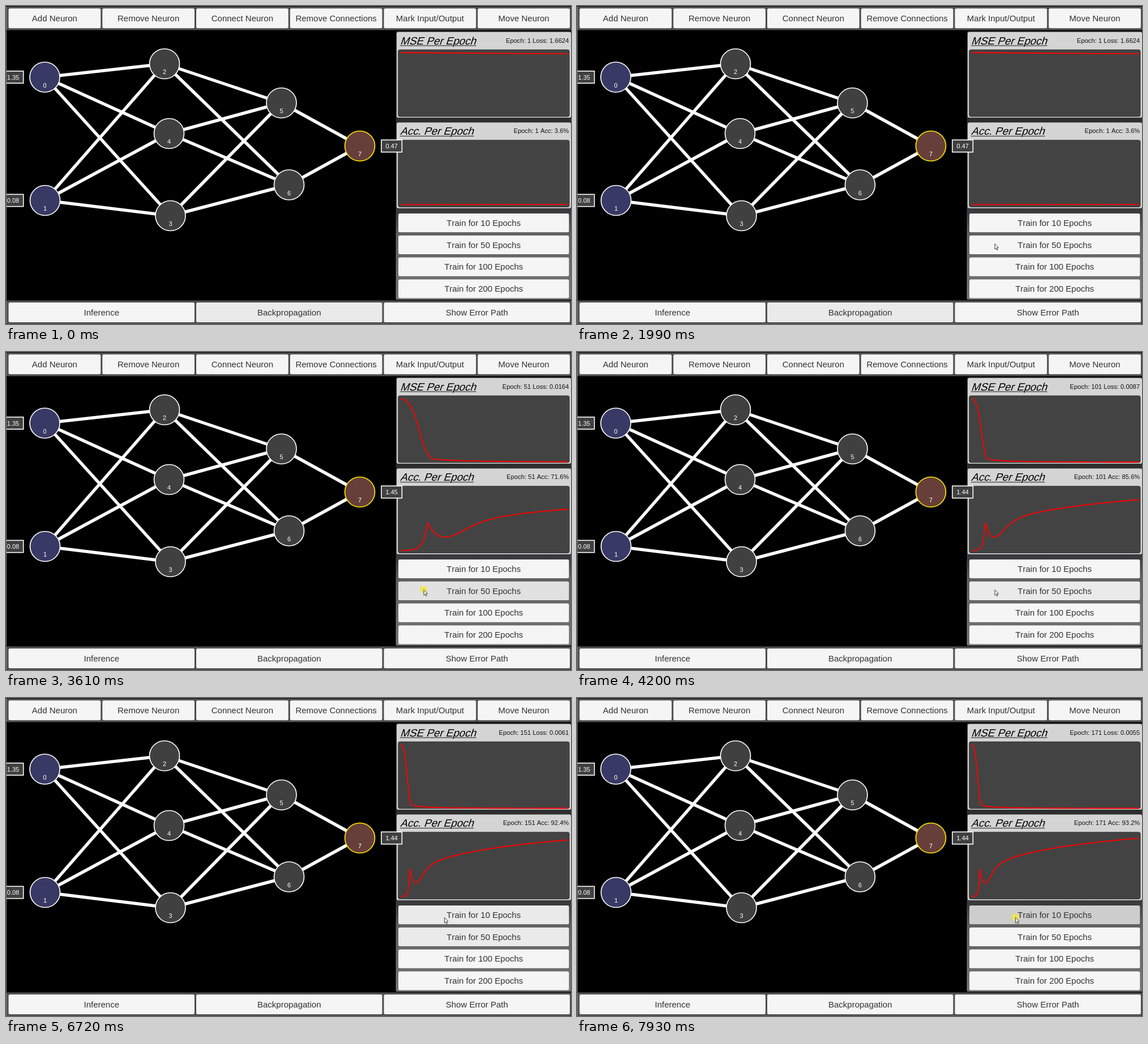
Animation, 998 px wide and 561 px high, one loop 8000 ms. Source, as an HTML page with a canvas:

```html
<!DOCTYPE html>
<html lang="en">
<head>
<meta charset="utf-8">
<title>Neural network trainer</title>
<style>
html, body { margin: 0; width: 100%; height: 100%; overflow: hidden; background: #000; }
canvas { display: block; }
</style>
</head>
<body>
<canvas id="stage" width="998" height="561"></canvas>
<script>
const ctx = document.getElementById('stage').getContext('2d');
const LOOP = 8000;
const SANS = '"Liberation Sans", Arial, sans-serif';
const NORMAL = 245, SELECTED = 234, PRESSED = 205;
const FADE = 60;

const nodes = [
  [68.5, 125.5], [69, 343], [280, 102], [290.5, 370],
  [288, 225], [486.5, 171], [500, 315.5], [625, 247]
];
const layers = [[0, 1], [2, 3, 4], [5, 6], [7]];

const epochSteps = [10, 50, 100, 200];
const untrained = { epoch: 1, loss: '1.6624', acc: '3.6', output: '0.47' };
const runs = [
  { press: 2090, done: 2800, btn: 1, loss: '0.0164', acc: '71.6', output: '1.45' },
  { press: 3593, done: 4200, btn: 1, loss: '0.0087', acc: '85.6', output: '1.44' },
  { press: 5093, done: 5710, btn: 1, loss: '0.0061', acc: '92.4', output: '1.44' },
  { press: 6803, done: 7030, btn: 0, loss: '0.0058', acc: '92.4', output: '1.44' },
  { press: 7313, done: 7530, btn: 0, loss: '0.0055', acc: '93.2', output: '1.44' },
  { press: 7870, done: LOOP, btn: 0 }
];
runs.reduce((epoch, run) => run.epoch = epoch + epochSteps[run.btn], untrained.epoch);

const pointerStart = { x: 988, y: 548, from: 190 };
const pointerMoves = [
  { from: 190, to: 590, x: 424, y: 443 },
  { from: 790, to: 1690, x: 709, y: 404 },
  { from: 1690, to: 1990, x: 737.5, y: 419 },
  { from: 6290, to: 6590, x: 774, y: 386.7 }
];
const HOVER_10 = 6590;

const clamp = v => Math.min(1, Math.max(0, v));
const mix = (a, b, k) => a + (b - a) * k;
const sigmoid = v => 1 / (1 + Math.exp(-v));
const grey = v => `rgb(${v},${v},${v})`;

// S-shaped drop, then a tail that shrinks with 1 / epoch
const loss = e => Math.max(1.69 * sigmoid(0.75 * (5.4 - e)), 0.85 / Math.max(e, 8));
const lossY = e => 194.9 - 112.6 * loss(e) / loss(0);

// Early spike at epoch 8, then logarithmic growth
function accY(e) {
  const spike = 45 * Math.exp(e < 8 ? 0.85 * (e - 8) : 0.3 * (8 - e));
  const growth = 25.2 * Math.log(1 + e / 2.9) * sigmoid((e - 16) / 4);
  return 350.4 - spike - growth;
}

function text(str, x, y, size, color, align = 'center') {
  ctx.font = `${size}px ${SANS}`;
  ctx.fillStyle = color;
  ctx.textAlign = align;
  ctx.fillText(str, x, y);
}

function box(x, y, w, h, r, fill) {
  ctx.beginPath();
  ctx.roundRect(x, y, w, h, r);
  ctx.fillStyle = fill;
  ctx.fill();
}

function button(label, x, y, w, h, shade = NORMAL) {
  box(x - 0.7, y - 0.7, w + 1.4, h + 1.4, 3, 'rgba(0,0,0,.25)');
  box(x, y, w, h, 2.5, grey(shade));
  text(label, x + w / 2, Math.round(y + h / 2 + 5.2), 15, '#323232');
}

function bar(y, h, labels, btnY, shades = []) {
  box(1, y, 997, h, 2, '#545454');
  const step = 994.5 / labels.length;
  labels.forEach((label, i) => button(label, 4.5 + i * step, btnY, step - 3, 35, shades[i]));
}

function valueBox(str, x, y) {
  ctx.fillStyle = '#404040';
  ctx.fillRect(x - 18.2, y - 10.7, 36.4, 21.4);
  ctx.strokeStyle = '#fff';
  ctx.lineWidth = 1.6;
  ctx.strokeRect(x - 18.2, y - 10.7, 36.4, 21.4);
  text(str, x, y + 4, 11, '#fff');
}

function network(output) {
  ctx.strokeStyle = '#fff';
  ctx.lineWidth = 5.5;
  ctx.beginPath();
  for (let i = 1; i < layers.length; i++) {
    for (const a of layers[i - 1]) {
      for (const b of layers[i]) {
        ctx.moveTo(...nodes[a]);
        ctx.lineTo(...nodes[b]);
      }
    }
  }
  ctx.stroke();
  nodes.forEach(([x, y], i) => {
    ctx.beginPath();
    ctx.arc(x, y, 26.5, 0, Math.PI * 2);
    ctx.fillStyle = i < 2 ? '#393965' : i === 7 ? '#673f3a' : '#404040';
    ctx.fill();
    ctx.strokeStyle = i === 7 ? '#ffeb04' : '#fff';
    ctx.lineWidth = 1.7;
    ctx.stroke();
    text(i, x, y + 18.4, 11, '#fff');
  });
  valueBox('1.35', 12.5, 125.5);
  valueBox('0.08', 12.5, 343);
  valueBox(output, 681.2, 247);
}

function chart(top, title, info, curve, epoch) {
  box(690, top, 308, 151.3, 3, '#d4d4d4');
  box(692.3, top + 30.9, 303.2, 118.7, 4, '#2c2c2c');
  box(693, top + 31.6, 301.8, 117.3, 3.5, '#434343');

  ctx.save();
  ctx.transform(1, 0, -0.33, 1, 696, top + 22);
  text(title, 0, 0, 18.8, '#000', 'left');
  const width = ctx.measureText(title).width;
  ctx.restore();
  ctx.fillRect(696, top + 23.5, width + 1, 1.3);
  text(info, 994.3, top + 18.9, 11.2, '#111', 'right');

  const last = Math.max(1, epoch - 1);
  ctx.save();
  ctx.beginPath();
  for (let e = 0; e <= last; e++) ctx.lineTo(698 + 294 * e / last, curve(e));
  ctx.strokeStyle = '#f00';
  ctx.lineWidth = 1.9;
  ctx.lineJoin = ctx.lineCap = 'round';
  ctx.stroke();
  ctx.restore();
}

function sidebar({ epoch, loss, acc }, shades) {
  const bg = ctx.createLinearGradient(0, 43, 0, 518);
  bg.addColorStop(0, '#222');
  bg.addColorStop(0.67, '#3a3a3c');
  bg.addColorStop(0.76, '#626262');
  bg.addColorStop(1, '#787878');
  box(688.6, 44, 309.4, 474, 2, bg);
  chart(45.8, 'MSE Per Epoch', `Epoch: ${epoch} Loss: ${loss}`, lossY, epoch);
  chart(205.4, 'Acc. Per Epoch', `Epoch: ${epoch} Acc: ${acc}%`, accY, epoch);
  epochSteps.forEach((n, i) =>
    button(`Train for ${n} Epochs`, 693, 366 + i * 38.75, 301.5, 33.3, shades[i]));
}

function pointerAt(t) {
  // The pointer moves in 100 ms ticks
  const tick = Math.floor((t - 90) / 100) * 100 + 90;
  let { x, y } = pointerStart;
  for (const move of pointerMoves) {
    const u = clamp((tick - move.from) / (move.to - move.from));
    const k = u * u * (3 - 2 * u);
    x = mix(x, move.x, k);
    y = mix(y, move.y, k);
  }
  return [x, y];
}

function pointer(t, down) {
  const [x, y] = pointerAt(t);
  if (down) {
    ctx.beginPath();
    ctx.arc(x, y, 6.8, 0, Math.PI * 2);
    ctx.fillStyle = 'rgba(240,232,70,.8)';
    ctx.fill();
  }
  ctx.save();
  ctx.translate(x + 0.5, y + 0.5);
  ctx.beginPath();
  ctx.moveTo(0, 0);
  ctx.lineTo(0, 9.6);
  ctx.lineTo(2.2, 7.7);
  ctx.lineTo(3.8, 11.2);
  ctx.lineTo(5.3, 10.5);
  ctx.lineTo(3.8, 7.1);
  ctx.lineTo(6.6, 6.8);
  ctx.closePath();
  ctx.fillStyle = '#f4f4f4';
  ctx.fill();
  ctx.strokeStyle = '#333';
  ctx.lineWidth = 0.9;
  ctx.stroke();
  ctx.restore();
}

function draw(t) {
  const state = runs.findLast(r => r.done <= t) || untrained;
  const click = runs.findLast(r => r.press <= t);
  const down = click && t < click.done;

  const shades = epochSteps.map((_, i) => {
    if (click && click.btn === i) {
      return down ? mix(SELECTED, PRESSED, clamp((t - click.press) / FADE)) : SELECTED;
    }
    return i === 0 && t >= HOVER_10 ? SELECTED : NORMAL;
  });
  const backShade = mix(SELECTED, NORMAL, clamp((t - runs[0].press) / FADE));

  ctx.fillStyle = '#000';
  ctx.fillRect(0, 0, 998, 561);
  bar(1, 41.5, ['Add Neuron', 'Remove Neuron', 'Connect Neuron', 'Remove Connections',
    'Mark Input/Output', 'Move Neuron'], 4.3);
  bar(519.5, 41.5, ['Inference', 'Backpropagation', 'Show Error Path'], 523, [NORMAL, backShade]);
  sidebar(state, shades);
  network(state.output);
  ctx.fillStyle = '#777';
  ctx.fillRect(0, 0, 1, 561);
  if (t >= pointerStart.from) pointer(t, down);
}

ctx.fontKerning = 'none';
const start = performance.now();
function loop() {
  draw((performance.now() - start) % LOOP);
  requestAnimationFrame(loop);
}
loop();
</script>
</body>
</html>
```
